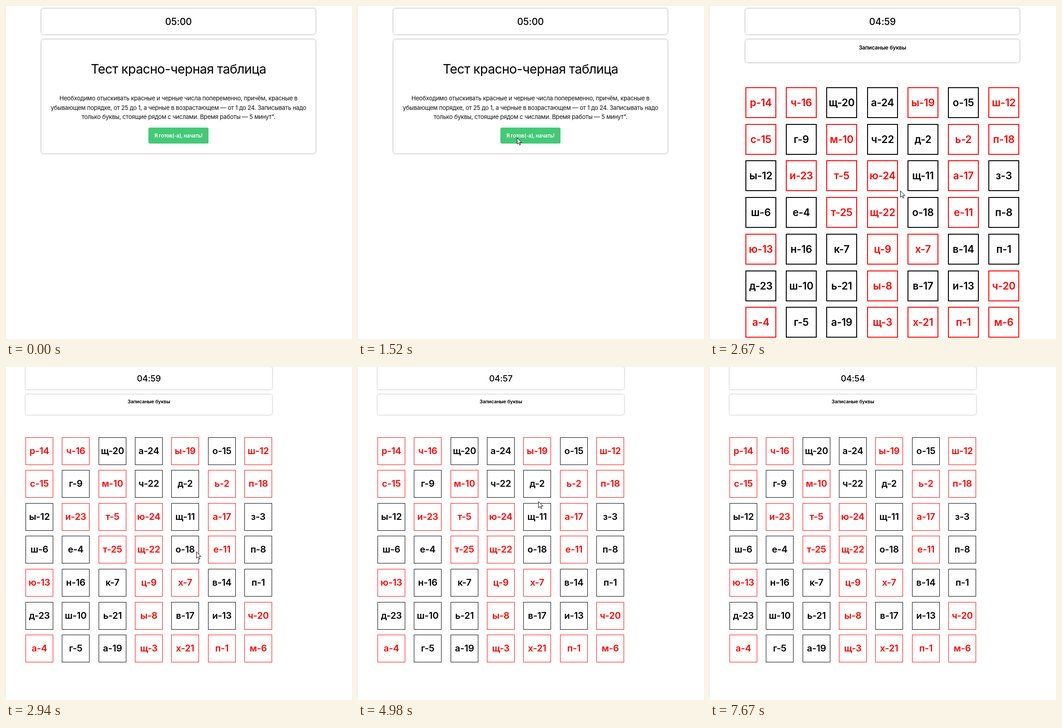
Animation, 762 px wide and 734 px high, one loop 8000 ms. Source, as an HTML page:

```html
<!DOCTYPE html>
<html lang="ru">
<head>
<meta charset="utf-8">
<style>
  html, body { margin: 0; width: 100%; height: 100%; overflow: hidden; background: #fff; }
  svg { display: block; }
  text {
    font-family: Inter, "Open Sans", sans-serif;
    font-optical-sizing: none;
    text-anchor: middle;
    letter-spacing: -.022em;
  }
  .card { fill: #fff; filter: drop-shadow(0 0 2px rgba(0, 0, 0, .4)); }
  .timer { font-size: 21px; font-weight: 500; letter-spacing: -.01em; }
  .title { font-size: 28.5px; }
  .para { font-size: 13.15px; fill: #111; }
  .button { font-size: 11.5px; font-weight: 600; fill: #fff; }
  .head { font-size: 12.1px; font-weight: 600; }
  .label { font-weight: 600; letter-spacing: -.01em; }
  .tile { fill: #fff; shape-rendering: crispEdges; }
</style>
</head>
<body>
<svg id="stage" width="762" height="734" viewBox="0 0 762 734"></svg>
<script>
const LOOP = 8000, BOARD_AT = 1650, ZOOM_AT = 2940, TICK_FROM = 1668;
const HIDE_AT = 6655;
const CENTER = 379.8;

// "!" marks a red tile
const tiles = `
  !р-14 !ч-16 щ-20 а-24 !ы-19 о-15 !ш-12
  !с-15 г-9 !м-10 ч-22 д-2 !ь-2 !п-18
  ы-12 !и-23 !т-5 !ю-24 щ-11 !а-17 з-3
  ш-6 е-4 !т-25 !щ-22 о-18 !е-11 п-8
  !ю-13 н-16 к-7 !ц-9 !х-7 в-14 п-1
  д-23 ш-10 ь-21 !ы-8 в-17 и-13 !ч-20
  !а-4 г-5 а-19 !щ-3 !х-21 !п-1 !м-6`.trim().split(/\s+/);

// time, x, y of the pointer tip
const path = [
  [190, 705, 722], [890, 392, 375], [960, 368, 341], [1400, 350, 290],
  [1840, 350, 290], [2120, 423, 406], [2270, 423, 406], [2470, 419, 407],
  [2990, 419, 407], [3210, 407, 419], [3400, 407, 419], [3720, 325, 418],
  [4160, 335, 361], [4220, 335, 361], [4980, 397, 296], [5300, 488, 276],
  [5480, 570, 262], [5730, 653, 285], [6450, 653, 285], [6590, 713, 283]
];

const text = (cls, y, content) =>
  `<text class="${cls}" x="${CENTER}" y="${y}">${content}</text>`;
const card = (y, height) =>
  `<rect class="card" x="78" y="${y}" width="603.5" height="${height}" rx="5"/>`;
const timerCard = card(6, 56) + text("timer", 42, "05:00");

const intro = timerCard + card(74, 250.7) +
  text("title", 149, "Тест красно-черная таблица") +
  text("para", 208, "Необходимо отыскивать красные и черные числа попеременно, причём, красные в") +
  text("para", 228.5, "убывающем порядке, от 25 до 1, а черные в возрастающем — от 1 до 24. Записывать надо") +
  text("para", 249, "только буквы, стоящие рядом с числами. Время работы — 5 минут\".") +
  `<rect x="313.5" y="268" width="132.5" height="35.3" rx="3.5" fill="#44c977"/>` +
  text("button", 290, "Я готов(-а), начать!");

const boardHead = timerCard + card(74, 50) + text("head", 96, "Записаные буквы");

function grid({ left, top, stepX, stepY, size, line, font }) {
  return tiles.map((tile, i) => {
    const color = tile[0] === "!" ? "#f00" : "#000";
    const x = Math.round(left + i % 7 * stepX);
    const y = Math.round(top + Math.floor(i / 7) * stepY);
    const side = size - line;
    return `<rect class="tile" x="${x + line / 2}" y="${y + line / 2}" width="${side}" height="${side}"
      stroke="${color}" stroke-width="${line}"/>
      <text class="label" x="${x + size / 2}" y="${Math.floor(y + size / 2 + font * .36)}"
      font-size="${font}" fill="${color}">${tile.replace("!", "")}</text>`;
  }).join("");
}

const board = boardHead +
  grid({ left: 78, top: 179, stepX: 89.2, stepY: 80.7, size: 68, line: 2, font: 22.6 });
const zoomed = `<g transform="translate(-27.2 -6.2) scale(.9)">${boardHead}</g>` +
  grid({ left: 43.1, top: 154.6, stepX: 80.3, stepY: 72.6, size: 61, line: 1, font: 20.3 });

const stage = document.getElementById("stage");
stage.innerHTML = [intro, board, zoomed].map(s => `<g class="scene">${s}</g>`).join("") +
  `<path id="pointer" d="M.5 .5V14.5L3.7 11.5 6 16.5 8 15.6 5.8 10.6H10.3Z" fill="#fff" stroke="#000"/>`;
const scenes = stage.querySelectorAll(".scene");
const timers = stage.querySelectorAll(".timer");
const pointer = document.getElementById("pointer");

function pointerAt(t) {
  const next = path.findIndex(p => p[0] > t);
  if (next < 0) return path[path.length - 1].slice(1);
  const [t0, x0, y0] = path[next - 1], [t1, x1, y1] = path[next];
  const k = (t - t0) / (t1 - t0);
  return [x0 + (x1 - x0) * k, y0 + (y1 - y0) * k].map(Math.round);
}

function draw(now) {
  const t = now % LOOP;
  const current = t < BOARD_AT ? 0 : t < ZOOM_AT ? 1 : 2;
  scenes.forEach((scene, i) => scene.style.display = i === current ? "" : "none");

  const left = 300 - Math.max(0, Math.floor((t - TICK_FROM) / 1000));
  const clock = [Math.floor(left / 60), left % 60].map(n => String(n).padStart(2, "0")).join(":");
  timers.forEach(timer => timer.textContent = clock);

  const visible = t >= path[0][0] && t < HIDE_AT;
  pointer.style.display = visible ? "" : "none";
  if (visible) pointer.setAttribute("transform", `translate(${pointerAt(t)})`);
}

const start = performance.now();
function tick() {
  draw(performance.now() - start);
  requestAnimationFrame(tick);
}
tick();
</script>
</body>
</html>
```
